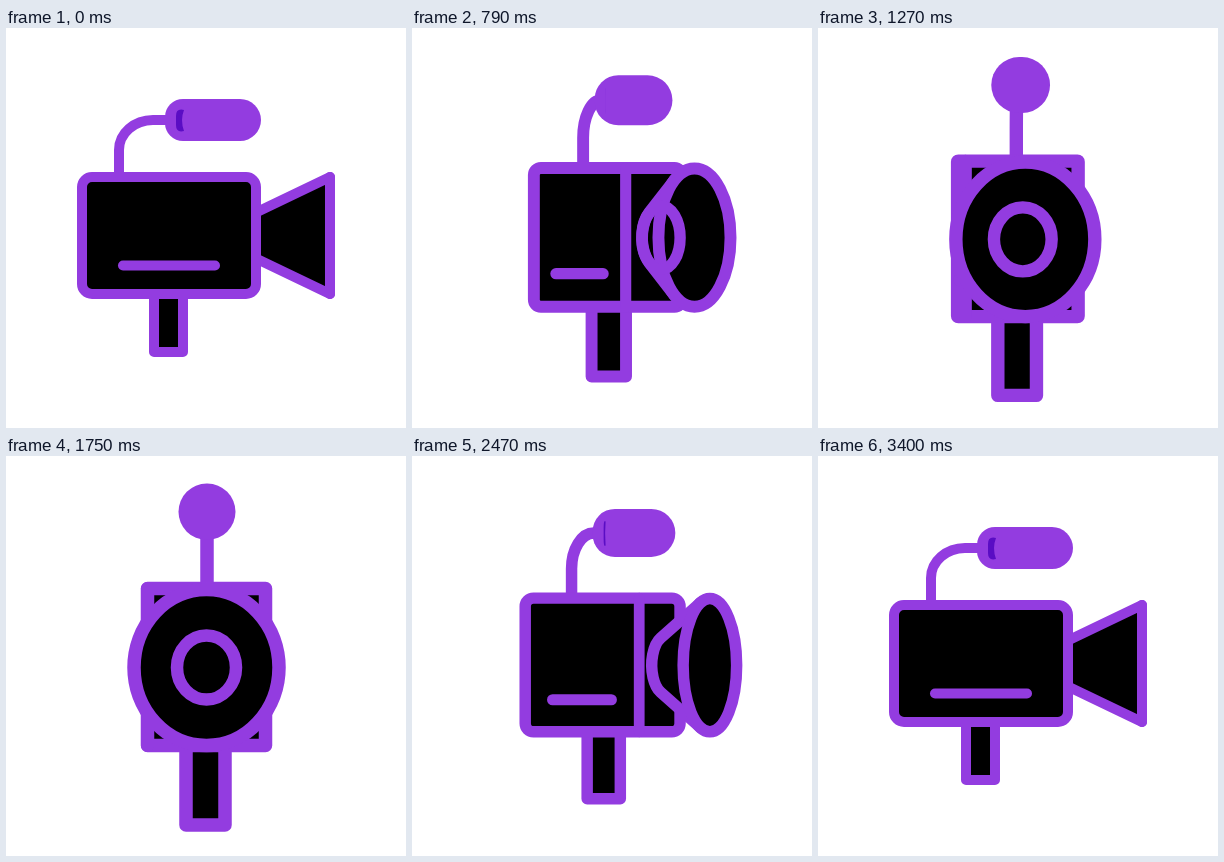
An HTML page with a canvas that plays this animation: 400 by 400 pixels, repeating every 3430 ms.

```html
<!DOCTYPE html>
<html lang="en">
<head>
<meta charset="utf-8">
<title>Turning camera</title>
<style>
html, body { margin: 0; width: 100%; height: 100%; overflow: hidden; background: #fff; }
canvas { display: block; width: 100vmin; height: 100vmin; }
</style>
</head>
<body>
<canvas id="stage" width="400" height="400"></canvas>
<script>
const ctx = document.getElementById('stage').getContext('2d');
const LOOP = 3430, HOLD = 430, STEP = 30;
const PURPLE = '#933ce0', DARK = '#5a0dc4', BLACK = '#000';

// 0 = seen from the side, 1 = seen from the front
const TURN = [[0, 0], [400, 0], [790, .545], [940, .765], [1270, .965], [1480, 1],
  [1810, 1], [2020, .92], [2470, .416], [2560, .21], [2740, 0], [LOOP, 0]];
// sideways sway of the whole camera
const SWAY = [[0, 0], [400, 0], [590, 8], [780, 0], [1070, 0], [1590, -3], [1740, 0],
  [2600, 0], [2890, -4], [2960, -4], [3100, -3], [3400, 0], [LOOP, 0]];

// Monotone cubic through the keys
function track(keys, t) {
  const slope = i => (keys[i + 1][1] - keys[i][1]) / (keys[i + 1][0] - keys[i][0]);
  const tangent = i => {
    if (i === 0 || i === keys.length - 1) return 0;
    const a = slope(i - 1), b = slope(i);
    return a * b > 0 ? 2 * a * b / (a + b) : 0;
  };
  let i = 0;
  while (i < keys.length - 2 && t >= keys[i + 1][0]) i++;
  const [t0, v0] = keys[i], [t1, v1] = keys[i + 1];
  const h = t1 - t0, u = (t - t0) / h, w = 1 - u;
  return v0 * (1 + 2 * u) * w * w + h * tangent(i) * u * w * w +
         v1 * u * u * (3 - 2 * u) - h * tangent(i + 1) * u * u * w;
}

function paint(fill, width) {
  if (fill) {
    ctx.fillStyle = fill;
    ctx.fill();
  }
  if (width) {
    ctx.lineWidth = width;
    ctx.stroke();
  }
}

function box(l, t, r, b, radius, fill, width) {
  ctx.beginPath();
  ctx.roundRect(l, t, r - l, b - t, radius);
  paint(fill, width);
}

function oval(x, y, rx, ry, fill, width) {
  ctx.beginPath();
  ctx.ellipse(x, y, Math.max(rx, .01), ry, 0, 0, 2 * Math.PI);
  ctx.closePath();
  paint(fill, width);
}

function segment(x1, y1, x2, y2, width) {
  ctx.beginPath();
  ctx.moveTo(x1, y1);
  ctx.lineTo(x2, y2);
  paint(null, width);
}

// Cone around two upright ellipses: follows their common tangents
function cone(near, far, y, width) {
  const reach = (e, a) => Math.hypot(e.rx * Math.cos(a), e.ry * Math.sin(a));
  const gap = a => (far.x - near.x) * Math.cos(a) - reach(far, a) + reach(near, a);
  if (gap(0) <= 0) return;
  let lo = 0, hi = Math.PI / 2;
  for (let i = 0; i < 30; i++) {
    const mid = (lo + hi) / 2;
    if (gap(mid) > 0) lo = mid; else hi = mid;
  }
  const touch = e => Math.atan2(-e.ry * Math.sin(lo), -e.rx * Math.cos(lo));
  const a = touch(near), b = touch(far);
  const fx = far.x + far.rx * Math.cos(b), fy = far.ry * Math.sin(b);
  ctx.beginPath();
  ctx.moveTo(fx, y + fy);
  ctx.ellipse(near.x, y, near.rx, near.ry, 0, a, -a, true);
  ctx.lineTo(fx, y - fy);
  ctx.closePath();
  paint(BLACK, width);
}

function draw(p, sway) {
  const q = p * (1 - p);
  // side value, front value, swing in between
  const mix = (a, b, swing = 0) => a + (b - a) * p + swing * q;
  const pen = mix(10, 13.5);

  ctx.fillStyle = '#fff';
  ctx.fillRect(0, 0, 400, 400);
  ctx.save();
  ctx.translate(sway, 0);
  ctx.strokeStyle = PURPLE;
  ctx.lineJoin = ctx.lineCap = 'round';

  const left = mix(76, 141.5, 41), right = mix(250, 259.5, 58);
  const top = mix(149, 132.5), bottom = mix(266, 289.5);

  // handle
  const hx = mix(162.5, 199.5, 57), hw = mix(14.5, 19.5);
  box(hx - hw, bottom - 8, hx + hw, mix(324, 369), 0, BLACK, pen);

  // cable
  const ml = mix(159, 172.5, 66), mr = mix(255, 229.5, 78);
  const mt = mix(71, 27.5), mb = mix(113, 84), my = (mt + mb) / 2;
  const bx = mix(113, 201, 41), bend = mix(34, 0, 10), drop = mix(30, 44);
  ctx.beginPath();
  ctx.moveTo(bx, top);
  ctx.lineTo(bx, my + drop);
  ctx.ellipse(bx + bend, my + drop, bend, drop, 0, Math.PI, 1.5 * Math.PI);
  ctx.lineTo(Math.max(ml + 6, bx + bend), my);
  paint(null, pen);

  // microphone
  const rl = mix(18, 28.25), rr = mix(21, 28.25);
  box(ml, mt, mr, mb, [rl, rr, rr, rl], PURPLE);
  const slot = 8 * (1 - p / .55);
  if (slot > 0) {
    const sx = ml + 11, ex = sx + slot, s = (mb - mt) / 42;
    ctx.beginPath();
    ctx.moveTo(ex, my - 10 * s);
    ctx.quadraticCurveTo(sx, my - 12 * s, sx, my - 4 * s);
    ctx.lineTo(sx, my + 5 * s);
    ctx.quadraticCurveTo(sx, my + 13 * s, ex, my + 11 * s);
    ctx.quadraticCurveTo(ex - slot / 2, my, ex, my - 10 * s);
    paint(DARK);
  }

  // body
  box(left, top, right, bottom, 10 * (1 - p * p), BLACK, pen);
  const edge = mix(250, 141.5, 92);
  if (p > 0) segment(edge, top, edge, bottom, mix(10, 13, -2));
  const ly = mix(237.5, 252.5);
  segment(mix(117, 141.5, 55), ly, mix(209, 141.5, 76), ly, mix(10, 12.5));

  // lens hood
  const cy = mix(207.5, 211.5);
  const rim = { x: mix(324, 200.5, 104), rx: mix(0, 72.5, -14), ry: mix(58.5, 78) };
  const neck = { x: mix(250, 200.5, 105), rx: mix(0, 29.5, 12), ry: 23 + 9 * Math.min(1, p * 1.8) };
  cone(neck, rim, cy, pen);
  oval(rim.x, cy, rim.rx, rim.ry, BLACK, pen);
  if (p > .48) {
    ctx.beginPath();
    ctx.rect(0, 0, right + pen / 2, 400);
    ctx.clip();
    oval(neck.x, cy, neck.rx, neck.ry, null, mix(10, 12.5));
  }
  ctx.restore();
}

function frame(now) {
  const t = now % LOOP;
  const at = t < HOLD ? 0 : HOLD + Math.floor((t - HOLD) / STEP) * STEP;
  draw(track(TURN, at), track(SWAY, at));
  requestAnimationFrame(frame);
}
frame(0);
</script>
</body>
</html>
```
